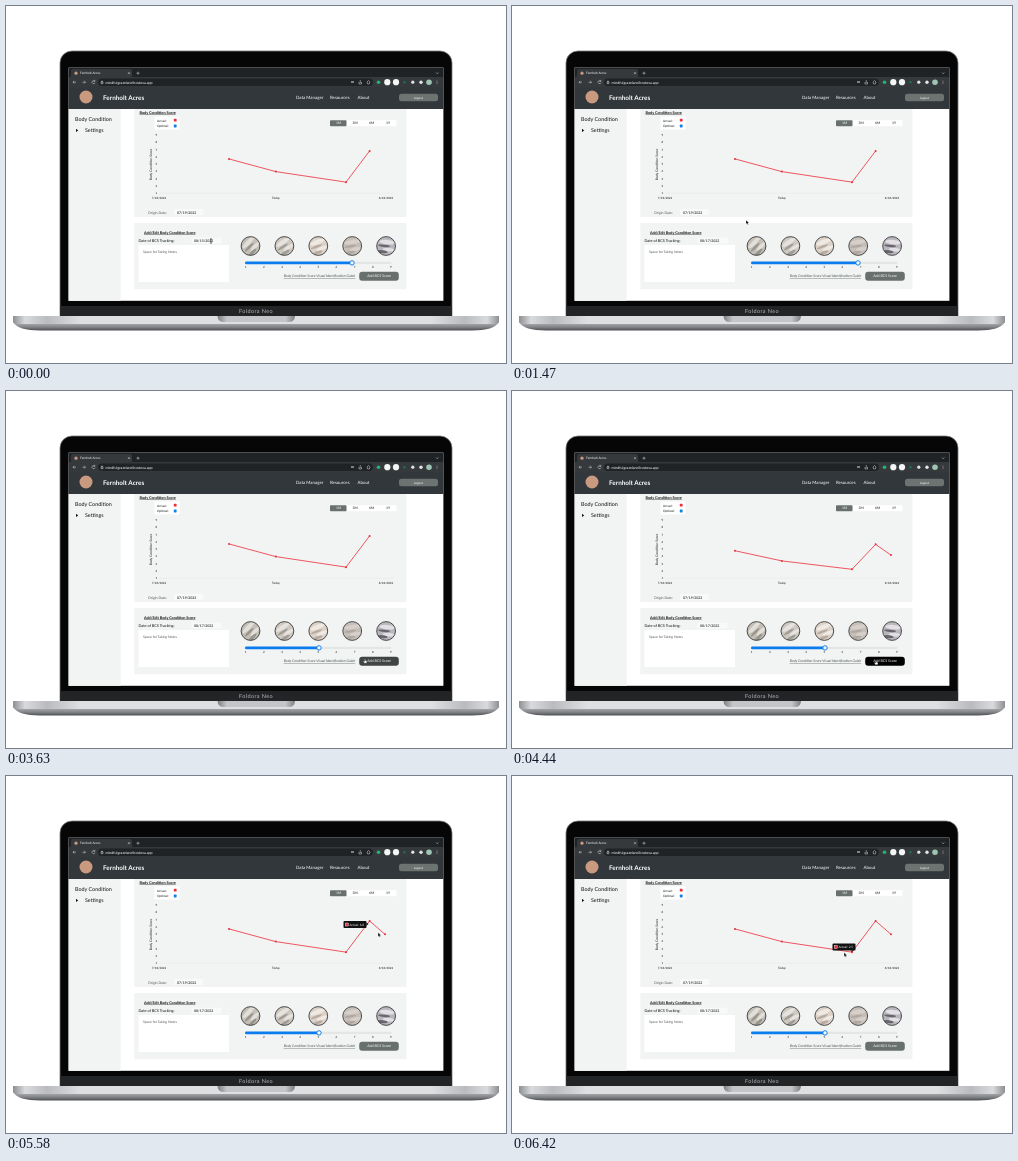
These frames come from a looping animation (500 px wide and 357 px high, 6450 ms). An HTML page:

```html
<!DOCTYPE html>
<html lang="en">
<head>
<meta charset="utf-8">
<title>Body condition dashboard</title>
<style>
  html, body { margin: 0; width: 100%; height: 100%; overflow: hidden; background: #fff; }
  svg { display: block; width: 500px; height: 357px; }
  text { font-family: Lato, "Open Sans", sans-serif; text-rendering: geometricPrecision; white-space: pre; }
</style>
</head>
<body>
<svg id="stage" viewBox="0 0 500 357">
  <defs>
    <linearGradient id="slab">
      <stop offset="0" stop-color="#8d8f92"/><stop offset=".025" stop-color="#d9dadc"/>
      <stop offset=".07" stop-color="#b9bbbe"/><stop offset=".14" stop-color="#dedfe1"/>
      <stop offset=".86" stop-color="#dedfe1"/><stop offset=".93" stop-color="#b9bbbe"/>
      <stop offset=".975" stop-color="#d9dadc"/><stop offset="1" stop-color="#8d8f92"/>
    </linearGradient>
    <linearGradient id="under" x2="0" y2="1">
      <stop offset="0" stop-color="#b4b6b9"/><stop offset=".6" stop-color="#828487"/>
      <stop offset="1" stop-color="#4c4e51"/>
    </linearGradient>
    <linearGradient id="notch">
      <stop offset="0" stop-color="#7b7d81"/><stop offset=".12" stop-color="#c3c5c8"/>
      <stop offset=".88" stop-color="#c3c5c8"/><stop offset="1" stop-color="#7b7d81"/>
    </linearGradient>
    <clipPath id="round"><circle r="9.2"/></clipPath>
  </defs>

  <!-- laptop -->
  <path d="M54 311V57A12 12 0 0 1 66 45H434A12 12 0 0 1 446 57V311Z" fill="#060607" stroke="#77797b" stroke-width=".8"/>
  <rect x="54.500" y="300" width="391" height="10" fill="#232426"/>
  <path d="M7 316H493Q488 324.500 466 324.500H34Q12 324.500 7 316Z" fill="url(#under)"/>
  <path d="M7 310H493V316Q492 318 488 318H12Q8 318 7 316Z" fill="url(#slab)"/>
  <path d="M211.500 310H289Q288.500 316 283 316H217.500Q212 316 211.500 310Z" fill="url(#notch)"/>

  <!-- browser -->
  <rect x="62.600" y="61.600" width="374.800" height="233.200" fill="#fff"/>
  <rect x="62.600" y="61.600" width="374.800" height="10" fill="#202326"/>
  <path d="M63 71.500Q65 71.500 65 69.500V65Q65 63 67 63H124Q126 63 126 65V69.500Q126 71.500 128 71.500Z" fill="#36393c"/>
  <rect x="62.600" y="71" width="374.800" height="10.500" fill="#36393c"/>
  <rect x="92" y="72.600" width="275" height="7.400" rx="3.700" fill="#202326"/>
  <rect x="62.600" y="81" width="374.800" height="22" fill="#31373b"/>
  <g fill="none" stroke="#dfe1e3" stroke-width=".5">
    <path d="M122 66.200l2 2m0-2l-2 2M130.500 67.200h3m-1.500-1.500v3M430 66.500l1.200 1.200 1.200-1.200"/>
    <path d="M70 76.200h-3m1.300-1.300l-1.300 1.300 1.300 1.300M76.500 76.200h3m-1.300-1.300l1.300 1.300-1.300 1.300"/>
    <path d="M88.800 75.300a1.500 1.500 0 1 0 .2 1.300m-.2-2.700v1.400h-1.400M95 76h2v1.700h-2zM95.400 76v-.8q.6-.9 1.200 0v.8"/>
    <path d="M345 75.500h3m-3 1h3M353 76v2h2.500v-2m-1.250 1v-3M361 76l1.500-1.500L364 76l-.6 1.900h-1.800z"/>
  </g>
  <g id="icons"></g>

  <!-- page -->
  <g fill="#f1f4f2">
    <rect x="62.600" y="103" width="52" height="191.800"/>
    <rect x="128.400" y="103" width="272" height="108"/>
    <rect x="128.400" y="217" width="272" height="66.300"/>
  </g>
  <g fill="#f8faf9">
    <rect x="168" y="203" width="29" height="6"/>
    <rect x="185.500" y="231.500" width="30" height="6"/>
  </g>
  <circle cx="80" cy="91" r="6.500" fill="#c99a80"/>
  <circle cx="70" cy="67.200" r="1.600" fill="#c99a80"/>
  <rect x="393" y="87.800" width="39" height="7.500" rx="2.500" fill="#6c7472"/>
  <path d="M70 122.700l2.200 1.700-2.200 1.700z" fill="#111"/>
  <rect x="148.500" y="110.500" width="25" height="13" fill="#fff"/>
  <rect x="167.800" y="112.800" width="2.800" height="2.800" rx=".6" fill="#ee2d3a"/>
  <rect x="167.800" y="118.600" width="2.800" height="2.800" rx=".6" fill="#1080f0"/>
  <rect x="324" y="114.200" width="66.500" height="6" fill="#fff"/>
  <rect x="324" y="114.200" width="16.500" height="6" rx=".8" fill="#69716f"/>
  <rect x="132.500" y="239" width="90.500" height="37" fill="#fff"/>
  <g id="photos"></g>
  <rect x="239" y="255.800" width="146.500" height="2.200" rx="1.100" fill="#e3e6e5"/>
  <rect id="fill" x="239" y="255.600" height="2.600" rx="1.300" fill="#0b7cf0"/>
  <circle id="knob" cy="256.900" r="2.200" fill="#fff" stroke="#0b7cf0" stroke-width="1"/>
  <rect id="button" x="353.200" y="265.700" width="39.600" height="9" rx="3"/>
  <g id="labels"></g>

  <!-- chart -->
  <path d="M153 187.200H387" stroke="#e0e3e1" stroke-width=".5"/>
  <path id="line" fill="none" stroke="#ee2d3a" stroke-width=".8" stroke-linejoin="round"/>
  <g id="dots" fill="#ee2d3a"></g>
  <g id="tip">
    <path id="caret" fill="#111"/>
    <rect width="23" height="7" rx="1" fill="#111"/>
    <rect x="1.800" y="2" width="3" height="3" fill="#ee2d3a" stroke="#fff" stroke-width=".4"/>
  </g>

  <g id="pointer" stroke-linejoin="round">
    <path id="arrow" d="M0 0V4.200L1 3.300 1.700 4.800 2.400 4.500 1.800 3.100H3.100Z" fill="#000" stroke="#fff" stroke-width=".35"/>
    <path id="beam" d="M-.9-2.300Q0-2.300 0-1.700 0-2.300.9-2.300M0-1.700V1.700M-.9 2.300Q0 2.300 0 1.700 0 2.300.9 2.300" fill="none" stroke="#111" stroke-width=".6"/>
    <path id="hand" d="M-.5-1.800Q0-2.400.5-1.800V-.4L1.800 0Q2.200.3 2 1.100L1.500 2.200H-.7L-1.800.4Q-1.400-.2-.5.4Z" fill="#fff" stroke="#111" stroke-width=".35"/>
  </g>
</svg>

<script>
const LOOP = 6450;
const $ = id => document.getElementById(id);

function add(parent, tag, attrs, content) {
  const el = document.createElementNS('http://www.w3.org/2000/svg', tag);
  for (const k in attrs) el.setAttribute(k, attrs[k]);
  if (content) el.textContent = content;
  parent.append(el);
  return el;
}
const label = (x, y, size, str, attrs, parent = $('labels')) =>
  add(parent, 'text', { x, y, 'font-size': size, fill: '#101213', ...attrs }, str);

const white = { fill: '#fff' }, mid = { 'text-anchor': 'middle' };
const whiteMid = { ...white, ...mid }, grey = { fill: '#505456' };
const heading = { 'font-weight': 700, 'text-decoration': 'underline' };

// browser and navigation
label(74, 68.400, 3.2, 'Fernholt Acres', white);
label(99.500, 77.500, 3.6, 'mindfulgrazeland.hostova.app', white);
label(97, 93.600, 6.4, 'Fernholt Acres', { ...white, 'font-weight': 700 });
label(290, 93.300, 4.4, 'Data Manager', white);
label(324, 93.300, 4.4, 'Resources', white);
label(351.500, 93.300, 4.4, 'About', white);
label(412.500, 92.600, 3, 'Logout', whiteMid);
label(69, 115, 5.4, 'Body Condition');
label(79, 126.200, 5.3, 'Settings');
label(250, 307, 5.5, 'Foldora Neo', { ...mid, fill: '#b5b7ba', 'letter-spacing': .4 });

// chart card
label(133.500, 107.500, 3.75, 'Body Condition Score', heading);
label(151, 115.600, 3.1, 'Actual:');
label(151, 121.300, 3.1, 'Optimal:');
['1M', '3M', '6M', '1Y'].forEach((s, i) =>
  label(332.500 + i * 16.500, 118.400, 3.4, s, i ? mid : whiteMid));
label(0, 0, 3.3, 'Body Condition Score', { ...mid, transform: 'translate(146 158.500) rotate(-90)' });
for (let v = 1; v <= 9; v++) {
  label(150.300, 188 - (v - 1) * 7.25, 2.9, v, mid);
  label(239.700 + (v - 1) * 18.150, 262.300, 2.9, v, mid);
}
label(153, 192.800, 2.9, '7/18/2022', mid);
label(270, 192.800, 3, 'Today', mid);
label(380, 192.800, 2.9, '8/18/2022', mid);
label(142, 207.500, 3.5, 'Origin Date:', grey);
label(171, 207.500, 3.5, '07/19/2022', { fill: '#000' });

// form card
label(138, 227.600, 3.7, 'Add/Edit Body Condition Score', heading);
label(132.500, 236, 3.8, 'Date of BCS Tracking:');
const date = label(188, 236, 3.5, '', { fill: '#000' });
label(137, 246.800, 3.4, 'Space for Taking Notes', grey);
label(277.700, 271.200, 3.58, 'Body Condition Score Visual Identification Guide',
  { ...grey, 'font-style': 'italic', 'text-decoration': 'underline' });
label(373, 271.400, 3.6, 'Add BCS Score', whiteMid);
const tipText = label(6, 4.700, 3.1, '', white, $('tip'));

// toolbar extension marks: x, colour, radius
[[372.500, '#20b573', 1.8], [381.300, '#f4f5f5', 3.1], [390, '#f4f5f5', 3.1], [398.500, '#17704e', 1.3],
 [406.800, '#e3e5e6', 1.6], [415, '#e3e5e6', 1.7], [423, '#9fc4b4', 2.8]]
  .forEach(([cx, fill, r]) => add($('icons'), 'circle', { cx, cy: 76.200, r, fill }));
for (const cy of [75, 76.200, 77.400]) add($('icons'), 'circle', { cx: 431, cy, r: .4, fill: '#e3e5e6' });

// coat close-ups as soft flat shapes: base, dark and light tones
[['#c3bfb6', '#85827a', '#efede8'], ['#cdc8c0', '#8f8a83', '#f1eeea'], ['#dcd2c8', '#a89c92', '#f8f4ef'],
 ['#c6bfb8', '#a59d96', '#ded8d2'], ['#b9b6bd', '#46434d', '#f4f3f5']].forEach(([base, dark, light], i) => {
  const g = add($('photos'), 'g', { transform: `translate(${244.500 + i * 33.900} 240)` });
  add(g, 'circle', { r: 9.2, fill: base });
  const inner = add(g, 'g', { 'clip-path': 'url(#round)' });
  const blob = (cx, cy, rx, ry, fill, turn) => add(inner, 'ellipse',
    { cx, cy, rx, ry, fill, opacity: .7, transform: `rotate(${turn})` });
  const tilt = i < 4 ? -45 + i * 12 : 5;
  blob(1, -4, 8, 2.2, light, tilt);
  blob(-2, 0, 6, 1.2, dark, tilt);
  blob(3, 3.5, 6, 1.8, light, tilt);
  blob(-3, 6, 5, 1.5, dark, tilt);
  add(g, 'circle', { r: 9.4, fill: 'none', stroke: '#222324', 'stroke-width': .8 });
});

// chart data: x, score
const scores = [[223, 5.7], [269.800, 3.95], [340, 2.5], [363.600, 6.8], [379, 4.95]];
const dots = scores.map(([cx]) => add($('dots'), 'circle', { cx, r: 1 }));

// pointer path: time, x, y
const path = [
  [0, 205, 235], [1000, 205, 235], [1400, 234, 214], [1500, 234, 214],
  [2050, 346, 257], [2250, 346, 257], [2580, 320, 257], [2720, 313, 257],
  [3050, 313, 257], [3630, 359, 270], [3900, 364, 271.500], [4780, 364, 271.500],
  [5380, 366, 149], [5580, 372, 156.500], [6100, 341, 176.500], [6420, 332, 176.500], [LOOP, 332, 176.500]
];
const clamp = v => Math.min(1, Math.max(0, v));
const ramp = (t, from, to) => clamp((t - from) / (to - from));

function pointerAt(t) {
  const i = path.findIndex(k => k[0] > t);
  const [t0, x0, y0] = path[i - 1], [t1, x1, y1] = path[i];
  const u = ramp(t, t0, t1), e = u * u * (3 - 2 * u);
  return [x0 + (x1 - x0) * e, y0 + (y1 - y0) * e];
}

const show = (el, on) => el.setAttribute('visibility', on ? 'visible' : 'hidden');

function drawChart(t) {
  const added = t >= 4110;
  const grow = added ? 1 - (1 - ramp(t, 4110, 5110)) ** 4 : 1;
  const points = scores.slice(0, added ? 5 : 4).map(([x, v]) => [x, 187 - (v - 1) * 7.25 * grow]);
  $('line').setAttribute('d', 'M' + points.join('L'));
  dots.forEach((dot, i) => {
    show(dot, points[i]);
    if (points[i]) dot.setAttribute('cy', points[i][1]);
  });
}

function drawTip(t) {
  const peak = t < 6060;
  const on = t >= 5370 && !(t > 5950 && peak);
  show($('tip'), on);
  if (!on) return;
  $('tip').setAttribute('transform', peak ? 'translate(337.500 145)' : 'translate(320.500 167.500)');
  $('caret').setAttribute('d', peak ? 'M23 1.500L25 3 23 4.500Z' : 'M18 7L19.500 8.500 21 7Z');
  tipText.textContent = 'Actual: ' + (peak ? '6.8' : '2.5');
}

function draw(t) {
  const [x, y] = pointerAt(t);
  const knob = t < 2250 ? 346 : t < 2720 ? x : 313;
  $('knob').setAttribute('cx', knob);
  $('fill').setAttribute('width', knob - 239);

  date.textContent = `08/${t < 450 ? 15 : t < 800 ? 16 : 17}/2022`;

  const dark = ramp(t, 3500, 3850) - ramp(t, 4850, 5150);
  const shade = [104, 112, 110].map(c => Math.round(c * (1 - dark)));
  $('button').setAttribute('fill', `rgb(${shade})`);

  drawChart(t);
  drawTip(t);

  const beam = x < 215 && y > 231;
  const hand = !beam && y > 254;
  show($('beam'), beam);
  show($('hand'), hand);
  show($('arrow'), !beam && !hand);
  $('pointer').setAttribute('transform', `translate(${x} ${y})`);
}

const start = performance.now();
function tick() {
  draw((performance.now() - start) % LOOP);
  requestAnimationFrame(tick);
}
tick();
</script>
</body>
</html>
```
